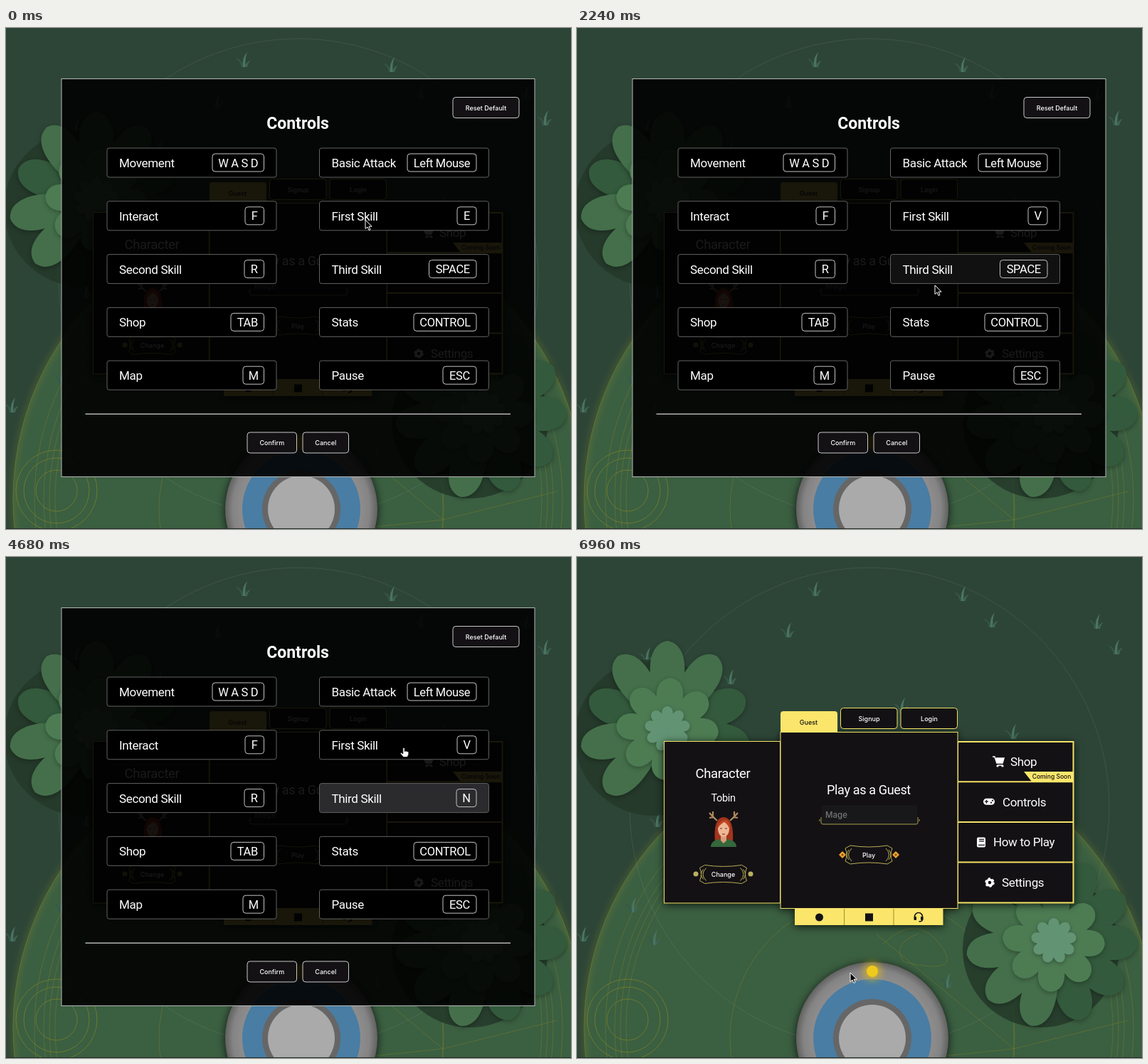
An HTML page that plays this animation: 794 by 705 pixels, repeating every 7000 ms.

```html
<!DOCTYPE html>
<html lang="en">
<head>
<meta charset="utf-8">
<title>Controls menu</title>
<style>
  html, body { margin: 0; width: 100%; height: 100%; overflow: hidden; background: #2d4537; }
  svg { display: block; }
  filter { color-interpolation-filters: sRGB; }
  text { font: 500 9px Inter, sans-serif; fill: #fff; }
  .big { font: 400 17px Roboto, sans-serif; letter-spacing: -.35px; }
  .key { font: 400 16.5px Roboto, sans-serif; letter-spacing: -.35px; }
  .mid { text-anchor: middle; }
  .gold { stroke: #f3e265; }
  .line { fill: none; }
</style>
</head>
<body>
<svg id="stage" width="794" height="705" viewBox="0 0 794 705"></svg>
<script>
const INK = '#131114', GOLD = '#fbe66b';
const stage = document.getElementById('stage');
const clamp = v => Math.max(0, Math.min(1, v));
const ease = v => v * v * (3 - 2 * v);
const env = (t, a, b, c, d) => clamp((t - a) / (b - a)) * clamp((d - t) / (d - c));
const within = (t, a, b) => t >= a && t < b;

// Markup helpers
const rect = (x, y, w, h, attrs) => `<rect x="${x}" y="${y}" width="${w}" height="${h}" ${attrs}/>`;
const circle = (x, y, r, attrs) => `<circle cx="${x}" cy="${y}" r="${r}" ${attrs}/>`;
const path = (d, attrs = '') => `<path d="${d}" ${attrs}/>`;
const text = (x, y, s, cls = 'mid', attrs = '') => `<text x="${x}" y="${y}" class="${cls}" ${attrs}>${s}</text>`;
const at = (x, y, body, attrs = '') => `<g transform="translate(${x} ${y})" ${attrs}>${body}</g>`;

// Scenery
const petal = (len, wide, angle, fill) => path(
  `M0 0C${-wide * .8} ${-len * .4} ${-wide * 1.1} ${-len * .95} 0 ${-len}C${wide * 1.1} ${-len * .95} ${wide * .8} ${-len * .4} 0 0`,
  `fill="${fill}" transform="rotate(${angle})"`);

const petals = (angles, len, wide, fill) =>
  `<g filter="url(#soft)">${angles.map(a => petal(len, wide, a, fill)).join('')}</g>`;

const spread = (n, turn) => Array.from({ length: n }, (_, i) => turn + i * 360 / n);

const flower = (x, y, shadowX, shade, light) => at(x, y,
  circle(shadowX, 12, 110, 'fill="#24392a" opacity=".85"') +
  petals(shade, 118, 34, '#335a3c') +
  petals(light, 124, 34, '#446f4a') +
  petals(spread(8, 4), 72, 26, '#4d7c53') +
  petals(spread(9, 0), 32, 11, '#629474'));

const tuft = ([x, y]) => at(x, y,
  path('M-3 9Q-4 0 -11 -3Q-4 -4 0 9Z', 'fill="#38594a"') +
  path('M-1 9Q-3 -4 5 -12Q1 -2 3 9Z', 'fill="#4a7461"') +
  path('M2 9Q3 1 10 0Q6 3 5 9Z', 'fill="#3f6454"'));

const tufts = [[334, 46], [541, 53], [582, 90], [730, 92], [757, 128], [296, 104], [98, 139], [215, 170],
  [612, 247], [456, 210], [112, 371], [78, 491], [108, 537], [8, 532], [520, 597]];

const olive = 'class="line" stroke="#8c8a24" stroke-opacity=".38"';
const scenery =
  rect(0, 0, 794, 705, 'fill="#2d4537"') +
  circle(411, 663, 401.5, 'fill="#3b5f41"') +
  circle(411, 663, 401, 'class="line" stroke="#8f922b" stroke-width="5" opacity=".35" filter="url(#glow)"') +
  circle(411, 663, 401, olive) +
  [342, 350, 358, 371].map(r => circle(411, 663, r, olive)).join('') +
  circle(415, 677, 200, olive) +
  [57, 46, 29].map(r => circle(71, 651, r, 'class="line" stroke="#8c8a24" stroke-opacity=".6"')).join('') +
  path('M420 530L614 692L775 652M614 705V560M614 692L490 705M430 545q45 -45 80 0t-50 25q-20 -25 20 -40', olive) +
  circle(411, 352, 337, 'class="line" stroke="#fff" stroke-opacity=".08"') +
  tufts.map(tuft).join('') +
  flower(127, 242, -20, [-68, 68, 102, 136], [-136, -102, -34, 34, 0]) +
  flower(670, 540, -18, [24, 58, 92, 126, 160], [-165, -132, -99, -66, -28]) +
  circle(415, 677, 107, 'fill="url(#stone)" filter="url(#drop)"') +
  circle(415, 677, 83, 'fill="#497da3"') +
  circle(415, 677, 55, 'fill="#666"') +
  circle(415, 677, 47, 'fill="#aaa"') +
  circle(415, 583, 13, 'fill="#e5bd12" opacity=".6" filter="url(#glow)"') +
  circle(415, 583, 8, 'fill="#f0c91d"') +
  rect(0, 704, 794, 1, 'fill="#222c26"');

// Main menu
const plaque = (x, y, label) => at(x, y,
  path('M-26 -13Q0 -9 26 -13L33 -9Q29 0 33 9L26 13Q0 9 -26 13L-33 9Q-29 0 -33 -9Z' +
       'M-24 -9q-9 9 0 18M24 -9q9 9 0 18M-28 -7q-6 7 0 14M28 -7q6 7 0 14',
       'class="line" stroke="#b8ae55"') +
  text(0, 3.5, label));

const avatar = at(206, 384,
  path('M-9 -13Q-15 -18 -20 -24M-13 -18L-20 -17M-15 -20V-26M9 -13Q15 -18 20 -24M13 -18L20 -17M15 -20V-26',
       'class="line" stroke="#b08a5e" stroke-width="2.2"') +
  path('M-12 17Q-15 -17 0 -18Q15 -17 13 17Z', 'fill="#a3341d"') +
  path('M-18 24Q-18 15 -5 13H5Q18 15 18 24Z', 'fill="#35683c"') +
  path('M-4 5H4V15L0 19L-4 15Z', 'fill="#d99b78"') +
  `<ellipse cy="-1" rx="8" ry="11" fill="#efb795"/>` +
  path('M-9 -1Q-7 -14 4 -14Q10 -11 9 0Q6 -8 1 -11Q-5 -8 -9 -1Z', 'fill="#c04525"') +
  path('M-5 -2h3M2 -2h3M-2 6h4', 'stroke="#5a2a20"'));

const cart = path('M-8 -7h3l3 9h8l2 -7h-11M-1 5h7', 'class="line" stroke="#fff" stroke-width="1.6"') +
  path('M-4 -5H8L6 2H-2Z', 'fill="#fff"') + circle(-1, 6, 1.6, 'fill="#fff"') + circle(6, 6, 1.6, 'fill="#fff"');
const pad = rect(-8, -5, 16, 9, 'rx="4.5" fill="#fff"') +
  path('M-6 -.5h5M-3.5 -3v5', `stroke="${INK}" stroke-width="1.3"`) +
  circle(3, 1, 1.1, `fill="${INK}"`) + circle(5, -2, 1.1, `fill="${INK}"`);
const book = rect(-6, -7, 12, 14, 'rx="2" fill="#fff"') +
  path('M-3 -4h7M-3 -1.5h7M-4 4h9', `stroke="${INK}" stroke-width="1.2"`);
const gear = circle(0, 0, 4, 'class="line" stroke="#fff" stroke-width="3.4"') +
  circle(0, 0, 5.6, 'class="line" stroke="#fff" stroke-width="2.4" stroke-dasharray="3 2.86"');
const headset = path('M-5.5 1V-1a5.5 5.5 0 0 1 11 0V3q0 3 -5 3', `class="line" stroke="${INK}" stroke-width="1.5"`) +
  rect(-6.5, -1, 3.5, 5, `rx="1" fill="${INK}"`) + rect(3, -1, 3.5, 5, `rx="1" fill="${INK}"`);

const entries = [['Shop', 592, 609, cart], ['Controls', 579, 598, pad], ['How to Play', 568, 585, book], ['Settings', 580, 597, gear]];
const tab = (x, label) => rect(x, 212.5, 79.5, 29, `rx="4" fill="${INK}" class="gold"`) + text(x + 40, 230.5, label);

const menu =
  `<g filter="url(#drop)">` +
  rect(122.5, 259.5, 163, 227.5, `fill="${INK}" class="gold"`) +
  rect(535, 260, 162.5, 226.5, `fill="${INK}" class="gold" stroke-width="2"`) +
  rect(306, 495, 208.5, 23, `fill="${GOLD}"`) +
  rect(286, 246.5, 249, 248, `fill="${INK}" class="gold"`) + `</g>` +
  path('M286 247V221q0 -4 4 -4h72q4 0 4 4v26Z', `fill="${GOLD}"`) +
  text(325.5, 235.5, 'Guest', 'mid', 'style="fill:#131114"') +
  tab(370.5, 'Signup') + tab(455, 'Login') +
  text(205, 311, 'Character', 'big mid', 'style="font-size:18.5px"') +
  text(205.5, 344, 'Tobin', 'big mid', 'style="font-size:14.5px"') +
  avatar + plaque(205.5, 446.5, 'Change') +
  circle(167, 446, 3.5, 'fill="#b9af5f"') + circle(244, 446, 3.5, 'fill="#b9af5f"') +
  text(410, 334, 'Play as a Guest', 'big mid', 'style="font-size:18px"') +
  rect(344, 350, 134, 26, 'fill="#18181a"') +
  path('M343 366v8q0 2 3 2H476q3 0 3 -2v-8M341 369v3M481 369v3', 'class="line" stroke="#a99d4c"') +
  text(349, 367, 'Mage', '', 'style="font-size:11.5px;fill:#77777a"') +
  plaque(410, 419, 'Play') +
  [373, 448].map(x => path(`M${x - 5} 419l5 -5l5 5l-5 5Z`, 'fill="#eda32b"') + circle(x, 419, 1.5, 'fill="#8a4d0b"')).join('') +
  entries.map(([label, ix, tx, icon], i) => {
    const y = 288 + i * 56.7;
    return (i ? path(`M535 ${y - 28.5}h163`, 'class="gold" stroke-width="2"') : '') +
      at(ix, y, icon) + text(tx, y + 6, label, 'big');
  }).join('') +
  path('M628 302H698V316H639Z', `fill="${GOLD}"`) +
  text(667, 312, 'Coming Soon', 'mid', 'style="font-size:8.5px;fill:#131114"') +
  path('M375.5 495v23M445 495v23', 'stroke="#a08d2c"') +
  circle(340.5, 507, 5.5, `fill="${INK}"`) + rect(405, 501.5, 11, 11, `fill="${INK}"`) + at(480, 507, headset);

// Controls dialog
const bindings = [
  ['Movement', 'W A S D', 290], ['Basic Attack', 'Left Mouse', 564],
  ['Interact', 'F', 336], ['First Skill', 'E', 634],
  ['Second Skill', 'R', 335], ['Third Skill', 'SPACE', 594.5],
  ['Shop', 'TAB', 316], ['Stats', 'CONTROL', 573],
  ['Map', 'M', 333], ['Pause', 'ESC', 614]];

const keycap = (left, right, y, label) =>
  rect(left, y, right - left, 25, 'rx="4" class="line" stroke="#c4c4c4"') +
  text((left + right) / 2, y + 18.5, label, 'key mid');

function binding([label, key, left], i) {
  const x = i % 2 ? 440.5 : 142, y = 169 + (i >> 1) * 74.8;
  return `<g id="b${i}">` + rect(x, y, 238, 41, 'rx="3" fill="#000" stroke="#626262" class="box"') +
    path(`M${x + 238} ${y + 3}v35`, 'class="edge" stroke="#000" stroke-width="1.4" stroke-dasharray="1.5 1.5" opacity="0"') +
    text(x + 17, y + 27, label, 'big') +
    `<g class="cap">${keycap(left, x + 220.5, y + 8, key)}</g></g>`;
}

const button = (id, x, y, w, label) => `<g id="${id}">` +
  rect(x, y, w, 29, `rx="4" fill="${INK}" stroke="#c8c8c8"`) + text(x + w / 2, y + 18, label) + '</g>';

const dialog = '<g id="dialog">' +
  rect(78, 71.5, 665, 560, 'fill="#000" fill-opacity=".9" stroke="#b5b9b6"') +
  text(410, 142, 'Controls', 'mid', 'style="font:700 23px Roboto,sans-serif"') +
  bindings.map(binding).join('') +
  path('M111.5 543.3H709', 'stroke="#b4b4b4" stroke-width="1.5"') +
  button('reset', 628, 97.5, 93, 'Reset Default') +
  button('confirm', 339, 569, 69.5, 'Confirm') + button('cancel', 417, 569, 64.5, 'Cancel') + '</g>';

const cursor = '<g id="cursor">' +
  path('M0 0V12.5L3 10L5 14.5L7 13.6L5 9.2H9Z', 'id="arrow" fill="#000" stroke="#fff" stroke-width="1"') +
  path('M-1.2 0q1.2 -1.6 2.4 0V4.5l2 -.6l1.2 .8l1.6 0l.8 1V9L5 12.5H-.5L-4.5 8q-.8 -1.8 .8 -1.8L-1.2 8Z',
       'id="hand" fill="#fff" stroke="#111" stroke-width=".8"') + '</g>';

stage.innerHTML = `<defs>
  <filter id="soft" x="-20%" y="-20%" width="140%" height="140%"><feDropShadow dx="0" dy="2" stdDeviation="3" flood-opacity=".3"/></filter>
  <filter id="drop" x="-20%" y="-20%" width="140%" height="140%"><feDropShadow dx="0" dy="2" stdDeviation="6" flood-opacity=".75"/></filter>
  <filter id="glow" x="-60%" y="-60%" width="220%" height="220%"><feGaussianBlur stdDeviation="5"/></filter>
  <radialGradient id="stone"><stop offset=".78" stop-color="#8e8c8c"/><stop offset=".9" stop-color="#858484"/><stop offset="1" stop-color="#626161"/></radialGradient>
</defs>` + scenery + menu + dialog + cursor;

// Motion
const $ = id => document.getElementById(id);
const trail = [[0, 505, 270], [500, 511, 266], [1150, 511, 266], [1480, 503, 300], [1800, 506, 345], [2000, 506, 345],
  [2150, 503, 362], [3500, 503, 362], [3640, 510, 345], [4450, 520, 342], [4680, 559, 269], [4950, 672, 114],
  [5560, 672, 114], [5880, 510, 344], [6250, 384, 585], [7000, 384, 585]];

function pointer(t) {
  const i = trail.findIndex(p => p[0] > t);
  const [t0, x0, y0] = trail[i - 1], [t1, x1, y1] = trail[i];
  const k = ease((t - t0) / (t1 - t0));
  return [x0 + (x1 - x0) * k, y0 + (y1 - y0) * k];
}

function setBinding(i, t, hover, shaking, listening) {
  const g = $('b' + i), box = g.querySelector('.box');
  const tint = n => Math.round(n * hover);
  box.setAttribute('fill', `rgb(${tint(46)},${tint(45)},${tint(48)})`);
  box.setAttribute('stroke', listening ? '#e00808' : '#626262');
  g.querySelector('.edge').setAttribute('opacity', listening ? 1 : 0);
  g.setAttribute('transform', `translate(${shaking ? (Math.floor(t / 80) % 2 ? -1 : 1) : 0} 0)`);
}

function setKey(i, left, label) {
  const cap = $('b' + i).querySelector('.cap');
  if (cap.dataset.label === label) return;
  cap.dataset.label = label;
  cap.innerHTML = keycap(left, 661, 177 + (i >> 1) * 74.8, label);
}

function grow(id, cx, cy, amount) {
  const s = 1 + .035 * amount;
  $(id).setAttribute('transform', `translate(${cx * (1 - s)} ${cy * (1 - s)}) scale(${s})`);
}

function draw(now) {
  const t = now % 7000;
  setKey(3, 634, within(t, 1340, 5200) ? 'V' : 'E');
  const rebound = within(t, 3250, 5200);
  setKey(5, rebound ? 633 : 594.5, rebound ? 'N' : 'SPACE');

  setBinding(3, t, env(t, 350, 550, 980, 1130), within(t, 860, 1340), within(t, 980, 1340));
  setBinding(5, t, Math.max(env(t, 1700, 1850, 2130, 2310), env(t, 3640, 3800, 4670, 4850)),
    within(t, 2350, 3250), within(t, 2350, 3250));

  grow('reset', 674.5, 112, env(t, 4880, 5030, 5820, 6000));
  grow('confirm', 373.5, 583.5, env(t, 6200, 6350, 6640, 6760));
  $('dialog').setAttribute('opacity', 1 - clamp((t - 6620) / 140));

  const hand = within(t, 350, 1000) || within(t, 1700, 2120) || within(t, 3620, 6640);
  $('cursor').setAttribute('transform', `translate(${pointer(t).join(' ')})`);
  $('arrow').setAttribute('opacity', hand ? 0 : 1);
  $('hand').setAttribute('opacity', hand ? 1 : 0);
  requestAnimationFrame(() => draw(performance.now() - start));
}

const start = performance.now();
draw(0);
</script>
</body>
</html>
```
